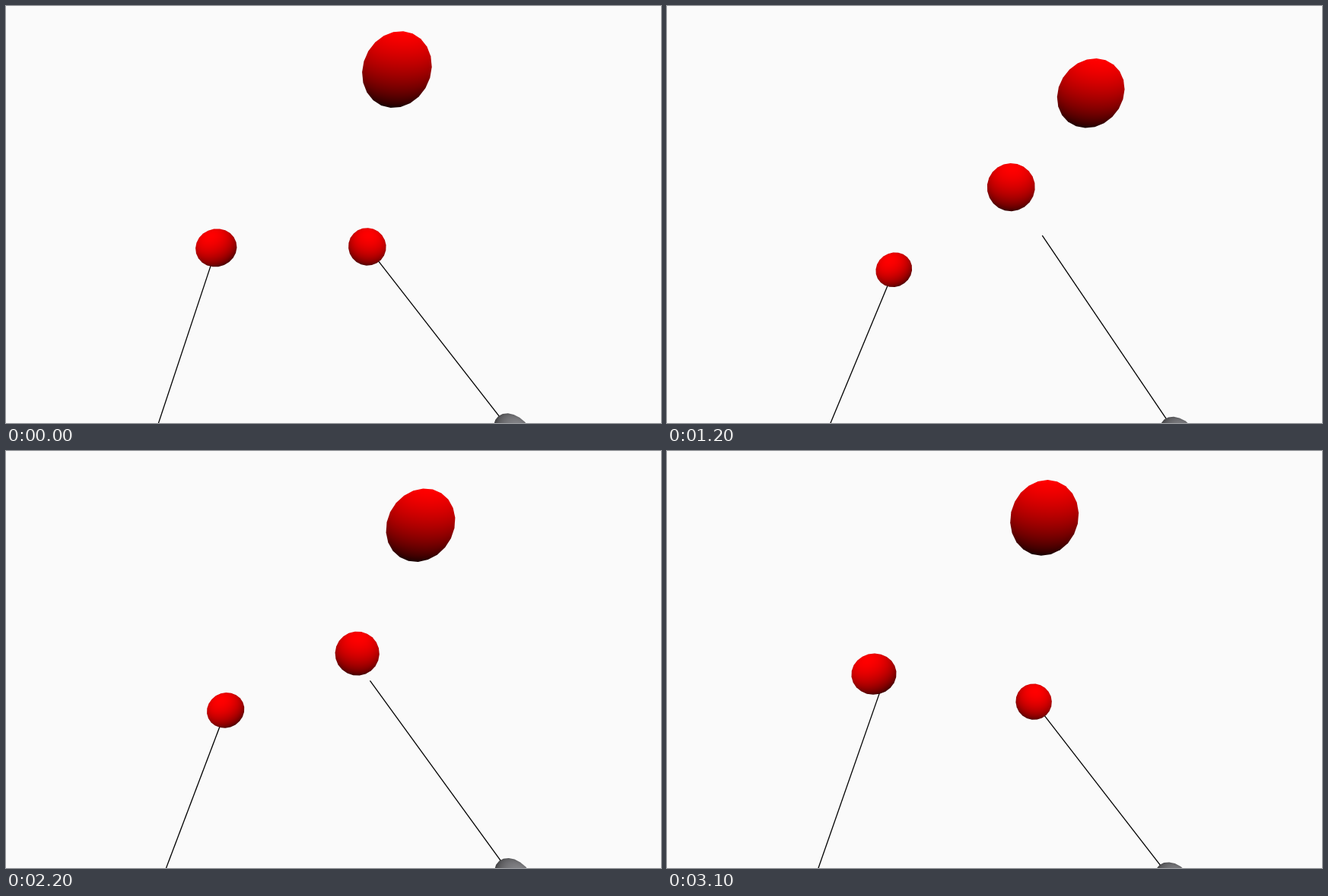
An HTML page with a canvas for the animation above (3.15 s loop, 861x549 px).

```html
<!DOCTYPE html>
<html lang="en">
<head>
<meta charset="utf-8">
<title>Three-ball cascade</title>
<style>
html, body { margin: 0; width: 100%; height: 100%; overflow: hidden; background: #fafafa; }
canvas { display: block; }
</style>
</head>
<body>
<canvas id="stage" width="861" height="549"></canvas>
<script>
const ctx = document.getElementById('stage').getContext('2d');
const W = 861, H = 549, CX = W / 2, CY = H / 2;

// Small buffer for shading one sphere at a time
const BUF = 128;
const buf = document.createElement('canvas');
buf.width = buf.height = BUF;
const bufCtx = buf.getContext('2d');
const pixels = bufCtx.createImageData(BUF, BUF);

// Camera: focal length, pitch, yaw, distance to the juggling plane (unit = ball radius)
const FOCAL = 357.7, SIN = 0.736, COS = 0.677, YAW = 0.0195, DIST = 8.55;

// Timing in seconds
const LOOP = 3.15, CYCLE = 1.05, BEAT = CYCLE / 2, STEP = 0.05;
const THROW = 0.032, FLIGHT = 0.991, CATCH = THROW + FLIGHT - BEAT, DWELL = 3 * BEAT - FLIGHT;

const REST = -10.93, DIP = 3.48, PEAK = -3.07, FALL = 32, SPEED = 7.67, MID = 2.04;

const HAND_X = [[0.032, 1.77], [0.075, 1.8], [0.15, 2.6], [0.275, 3.92], [0.4, 5.2], [0.475, 5.47],
  [0.498, 5.83], [0.55, 6.08], [0.6, 6.08], [0.675, 5.72], [0.8, 4.45], [0.925, 3], [1, 2.36]];
const ARM_X = [[0, 655.2], [0.075, 656], [0.15, 660], [0.275, 661], [0.4, 662], [0.475, 662],
  [0.525, 660.5], [0.6, 653], [0.675, 646], [0.8, 641], [0.925, 641.5], [1, 651.3]];

const mod = (a, n) => ((a % n) + n) % n;

// Smooth periodic curve through [time, value] keys
function curve(keys, t) {
  const n = keys.length;
  const key = i => [keys[mod(i, n)][0] + Math.floor(i / n) * CYCLE, keys[mod(i, n)][1]];
  t = keys[0][0] + mod(t - keys[0][0], CYCLE);
  let i = 0;
  while (key(i + 1)[0] <= t) i++;
  const [a, b, c, d] = [key(i - 1), key(i), key(i + 1), key(i + 2)];
  const h = c[0] - b[0], s = (t - b[0]) / h;
  const m0 = (c[1] - a[1]) / (c[0] - a[0]) * h;
  const m1 = (d[1] - b[1]) / (d[0] - b[0]) * h;
  const r = 1 - s;
  return b[1] * (1 + 2 * s) * r * r + c[1] * s * s * (3 - 2 * s) + m0 * s * r * r - m1 * s * s * r;
}

const phase = (side, t) => mod(t + (side < 0 ? BEAT : 0), CYCLE);

function hand(side, t) {
  const ph = phase(side, t);
  const s = mod(ph - CATCH, CYCLE) / DWELL;
  const drop = s < 1 ? DIP * Math.pow(4 * s * (1 - s), 0.83) : 0;
  return { x: side * curve(HAND_X, ph), u: REST - drop };
}

function ball(i, t) {
  const a = mod(t + i * CYCLE - THROW, LOOP);
  const side = a < LOOP / 2 ? 1 : -1;
  const b = a % (LOOP / 2);
  if (b >= FLIGHT) return hand(-side, t);
  const tau = b - FLIGHT / 2;
  return { x: -side * (MID + SPEED * tau), u: PEAK - FALL * tau * tau };
}

function project({ x, u }) {
  const cx = x * Math.cos(YAW) - DIST * Math.sin(YAW);
  const w = DIST * Math.cos(YAW) + x * Math.sin(YAW);
  const d = w * COS - u * SIN;
  const y = u * COS + w * SIN;
  return { x: CX + FOCAL * cx / d, y: CY - FOCAL * y / d, d };
}

// Sky light on a unit sphere at depth d, traced for each pixel of the buffer
function shade(p, q, d, rgb, left, top) {
  const cx = p * d, cy = q * d, cc = cx * cx + cy * cy + d * d;
  for (let j = 0, k = 0; j < BUF; j++) {
    const ry = (CY - top - j - 0.5) / FOCAL;
    for (let i = 0; i < BUF; i++, k += 4) {
      const rx = (left + i + 0.5 - CX) / FOCAL;
      const rr = rx * rx + ry * ry + 1, rc = rx * cx + ry * cy + d;
      const hit = (rc - Math.sqrt(Math.max(0, rc * rc - rr * (cc - 1)))) / rr;
      const up = (ry * hit - cy) * COS - (hit - d) * SIN;
      const light = Math.min(1, Math.max(0, (1 + up) / 2));
      for (let c = 0; c < 3; c++) pixels.data[k + c] = rgb[c] * light;
      pixels.data[k + 3] = 255;
    }
  }
  bufCtx.putImageData(pixels, 0, 0);
}

function sphere(pt, rgb) {
  const p = (pt.x - CX) / FOCAL, q = (CY - pt.y) / FOCAL, d = pt.d;
  const k = d * d - 1;
  const minor = FOCAL / Math.sqrt(k);
  const major = FOCAL * Math.sqrt(d * d * (1 + p * p + q * q) - 1) / k;
  const x = CX + p * FOCAL * d * d / k, y = CY - q * FOCAL * d * d / k;
  const dir = Math.atan2(-q, p), cd = Math.cos(dir), sd = Math.sin(dir);
  const left = Math.round(x - BUF / 2), top = Math.round(y - BUF / 2);
  shade(p, q, d, rgb, left, top);

  ctx.save();
  ctx.beginPath();
  const sides = 22;
  for (let i = 0; i < sides; i++) {
    const a = i / sides * Math.PI * 2;
    const ex = major * Math.cos(a), ey = minor * Math.sin(a);
    ctx.lineTo(x + ex * cd - ey * sd, y + ex * sd + ey * cd);
  }
  ctx.closePath();
  ctx.clip();
  ctx.drawImage(buf, left, top);
  ctx.restore();
}

function arm(side, t) {
  const ph = phase(side, t);
  const h = project(hand(side, t));
  const edge = curve(ARM_X, ph);
  const ex = side > 0 ? edge : W - edge;
  const y = 602 - 40 * Math.cos((ph - 0.052) / CYCLE * Math.PI * 2) + (side < 0 ? 9 : 0);
  const x = h.x + (ex - h.x) * (y - h.y) / (H - h.y);
  ctx.beginPath();
  ctx.moveTo(h.x, h.y);
  ctx.lineTo(x, y);
  ctx.strokeStyle = '#000';
  ctx.lineWidth = 1.3;
  ctx.stroke();
  sphere({ x, y, d: 16 }, [136, 136, 140]);
}

function draw(t) {
  ctx.fillStyle = '#fafafa';
  ctx.fillRect(0, 0, W, H);
  arm(-1, t);
  arm(1, t);
  [0, 1, 2].map(i => project(ball(i, t)))
    .sort((a, b) => b.d - a.d)
    .forEach(pt => sphere(pt, [255, 0, 0]));
}

let start = null, shown = -1;
function tick(now) {
  if (start === null) start = now;
  const step = Math.floor(mod((now - start) / 1000, LOOP) / STEP + 1e-6);
  if (step !== shown) {
    shown = step;
    draw(step * STEP);
  }
  requestAnimationFrame(tick);
}
draw(0);
requestAnimationFrame(tick);
</script>
</body>
</html>
```
